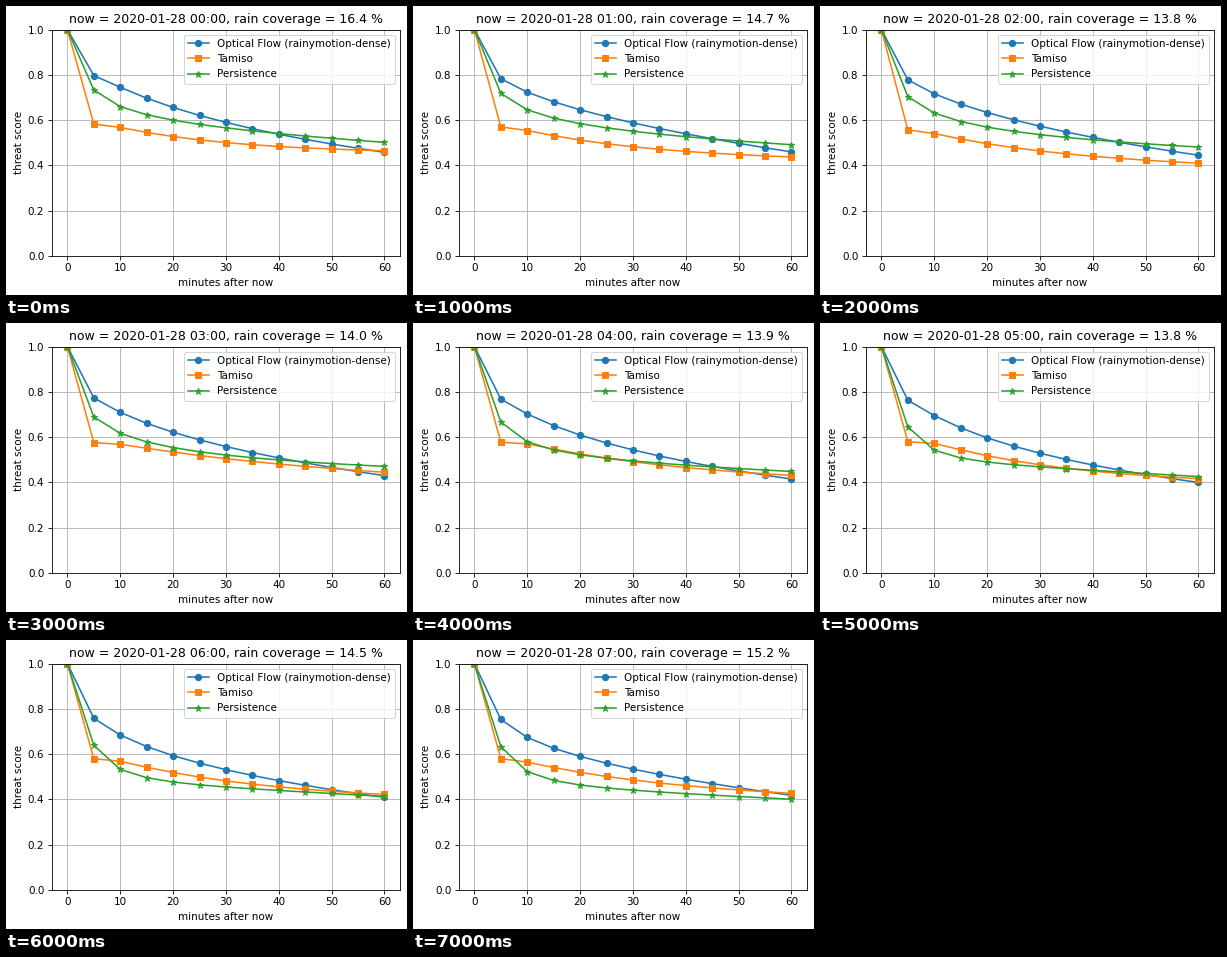
These frames come from a looping animation (401x289 px, 8 s). A matplotlib script:

```python
import numpy as np
import matplotlib.pyplot as plt
from matplotlib.animation import FuncAnimation

W, H, DPI = 401, 289, 75
LEFT, TOP, AX_W, AX_H = 45.55, 23.55, 348.75, 226.5
HOURS = 8

plt.rcParams["font.family"] = "DejaVu Sans"

minutes = np.arange(0, 61, 5)
anchors = [5, 15, 30, 60]

# Threat scores at the anchor minutes for a few key hours.
flow = {
    0: (.797, .697, .590, .458),
    1: (.783, .681, .588, .460),
    5: (.763, .641, .529, .400),
    7: (.753, .626, .534, .418),
}
model = {
    0: (.583, .546, .501, .465),
    2: (.557, .517, .464, .410),
    3: (.576, .551, .505, .445),
    5: (.580, .544, .478, .417),
    7: (.580, .541, .486, .427),
}
persistence = {
    0: (.733, .624, .566, .502),
    3: (.689, .579, .521, .471),
    5: (.645, .508, .469, .426),
    7: (.633, .484, .441, .401),
}
coverage = {0: 16.4, 1: 14.7, 2: 13.8, 3: 14.0, 5: 13.8, 7: 15.2}


def blend(keys, hour):
    """Linear blend between the key hours."""
    return np.interp(hour, list(keys), list(keys.values()))


def scores(keys, hour):
    """A perfect 1 at the start, then a cubic in log time through the anchors."""
    heights = [blend(dict(zip(keys, column)), hour)
               for column in zip(*keys.values())]
    curve = np.polyfit(np.log(anchors), heights, 3)
    return np.append(1, np.polyval(curve, np.log(minutes[1:])))


# The tiny margin keeps float rounding from losing a pixel.
fig = plt.figure(figsize=((W + 1e-4) / DPI, (H + 1e-4) / DPI), dpi=DPI,
                 facecolor="white")
ax = fig.add_axes([LEFT / W, 1 - (TOP + AX_H) / H, AX_W / W, AX_H / H])

series = [
    ("Optical Flow (rainymotion-dense)", "o", flow),
    ("Tamiso", "s", model),
    ("Persistence", "*", persistence),
]
lines = [ax.plot(minutes, scores(keys, 0), marker=marker, label=label)[0]
         for label, marker, keys in series]

ax.set_xlim(-3, 63)
ax.set_ylim(0, 1)
ax.set_xticks(range(0, 61, 10))
ax.set_yticks(np.linspace(0, 1, 6))
ax.set_xlabel("minutes after now")
ax.set_ylabel("threat score")
ax.grid(True)
ax.legend(loc="upper right")
title = ax.set_title("")


def update(hour):
    for line, (_, _, keys) in zip(lines, series):
        line.set_ydata(scores(keys, hour))
    rain = blend(coverage, hour)
    title.set_text(f"now = 2020-01-28 {hour:02d}:00, rain coverage = {rain:.1f} %")
    return [*lines, title]


anim = FuncAnimation(fig, update, frames=HOURS, interval=1000, repeat=True,
                     repeat_delay=0, blit=False)
plt.show()
```
